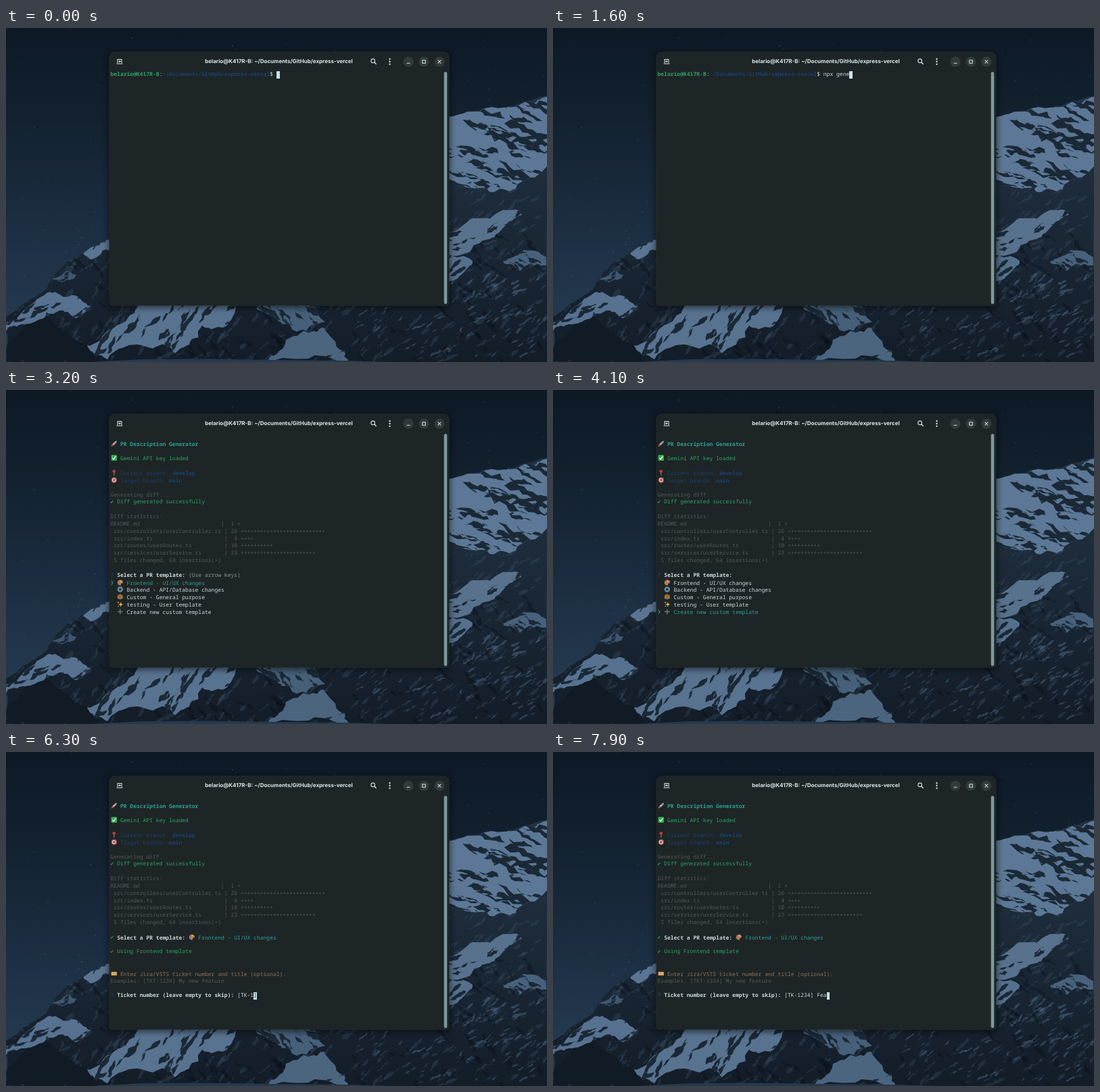
Recreate the animation shown at these times as an HTML page with a canvas. Size 800 by 495 pixels, loop 8 s.

```html
<!DOCTYPE html>
<html lang="en">
<head>
<meta charset="utf-8">
<title>Terminal</title>
<style>
html, body { margin: 0; width: 100%; height: 100%; overflow: hidden; background: #111d2a; }
#stage { position: relative; width: 800px; height: 495px; overflow: hidden; }
#wall, #chrome { position: absolute; left: 0; top: 0; }
#win {
  position: absolute; left: 153px; top: 36px; width: 502px; height: 375px;
  background: #1e2526; border-radius: 8px 8px 4px 4px;
  box-shadow: 0 0 0 .5px #2a3536, 0 2px 9px 2px rgba(0, 0, 0, .5);
}
#title {
  position: absolute; left: 253px; top: 43px; width: 301px; height: 13px;
  font: 700 8px/13px Inter, "Open Sans", sans-serif; text-align: center;
  color: #d9e8ea; white-space: pre; text-rendering: geometricPrecision;
}
#term {
  position: absolute; left: 154.5px; top: 64px; color: #c9dadd;
  font: 8.03px/10.83px "Noto Sans Mono", "DejaVu Sans Mono", monospace;
  white-space: pre; text-rendering: geometricPrecision; font-variant-ligatures: none;
}
.row { position: absolute; left: 0; height: 10.83px; }
.row svg { width: 2ch; height: 9px; vertical-align: -1.5px; }
.one, .cur { display: inline-block; width: 1ch; height: 10.83px; vertical-align: top; }
.one { font-family: "DejaVu Sans Mono", monospace; }
.cur { background: #c8e2e8; color: #1e2526; }
.b { font-weight: 700; }
.green { color: #2ba567; }
.cyan { color: #2ba39a; }
.blue { color: #1b4273; }
.gray { color: #515a5b; }
.hint { color: #8c999b; }
.tan { color: #8d7460; }
</style>
</head>
<body>
<div id="stage">
  <canvas id="wall" width="800" height="495"></canvas>
  <div id="win"></div>
  <svg id="chrome" width="800" height="495" fill="none" stroke="#d3e3e6" stroke-width="1.1">
    <path d="M165 52v-5.5h6v5.5M163.5 53h9M168 47.7v3.6M166.2 49.5h3.6"/>
    <circle cx="542.6" cy="48.7" r="2.8"/><path d="M544.7 50.8l2.9 2.9" stroke-width="1.4"/>
    <g fill="#d3e3e6" stroke="none">
      <circle cx="567.5" cy="46" r="1.2"/><circle cx="567.5" cy="49.8" r="1.2"/><circle cx="567.5" cy="53.6" r="1.2"/>
    </g>
    <g fill="#323b3c" stroke="none">
      <circle cx="595" cy="50" r="7.6"/><circle cx="618" cy="50" r="7.6"/><circle cx="641" cy="50" r="7.6"/>
    </g>
    <path d="M592.6 52.3h4.8M615.8 47.8h4.4v4.4h-4.4zM638.7 47.7l4.6 4.6M643.3 47.7l-4.6 4.6"/>
    <rect x="647.7" y="65" width="4.6" height="344" rx="2.3" fill="#7d999b" stroke="none"/>
  </svg>
  <div id="title"></div>
  <div id="term"></div>
</div>

<svg width="0" height="0" style="position:absolute">
  <symbol id="rocket" viewBox="0 0 10 10">
    <path d="M1 6l3-2 2 2-2 3z" fill="#c4423d"/><path d="M3 6q2-5 6.5-5.5Q9 5 4 7z" fill="#b9c8cf"/>
    <circle cx="6.5" cy="3.4" r="1.1" fill="#3b6f96"/><path d="M.5 9.5l1-2.5 1.6 1.5z" fill="#e3a13b"/>
  </symbol>
  <symbol id="ok" viewBox="0 0 10 10">
    <rect x=".3" y=".3" width="9.4" height="9.4" rx="1.5" fill="#35ad52"/>
    <path d="M2.2 5.2l2 2.2 3.7-5" fill="none" stroke="#e6f5ea" stroke-width="1.4"/>
  </symbol>
  <symbol id="pin" viewBox="0 0 10 10">
    <path d="M5 4v5.8" stroke="#8d9ca3"/><circle cx="5" cy="2.9" r="2.6" fill="#bd3c38"/>
  </symbol>
  <symbol id="goal" viewBox="0 0 10 10">
    <circle cx="5" cy="5" r="4.7" fill="#b64740"/><circle cx="5" cy="5" r="3.3" fill="#cdd3d3"/>
    <circle cx="5" cy="5" r="2" fill="#b64740"/><path d="M5 5l4-4" stroke="#4f7891"/>
  </symbol>
  <symbol id="palette" viewBox="0 0 10 10">
    <path d="M5 .6C10 .6 11 6 7.5 6 5.5 6 7.5 9.4 5 9.4-1 9.4-1 .6 5 .6z" fill="#bd8256"/>
    <circle cx="3" cy="3.4" r="1.1" fill="#cf4a45"/><circle cx="6" cy="2.6" r="1.1" fill="#e0bd4b"/>
    <circle cx="2.8" cy="6.4" r="1.1" fill="#4b88b8"/>
  </symbol>
  <symbol id="gear" viewBox="0 0 10 10">
    <circle cx="5" cy="5" r="4" fill="none" stroke="#7ba5b7" stroke-width="1.5" stroke-dasharray="1.7 .8"/>
    <circle cx="5" cy="5" r="2.7" fill="none" stroke="#7ba5b7" stroke-width="1.3"/>
  </symbol>
  <symbol id="box" viewBox="0 0 10 10">
    <path d="M.6 2.8L5 .6l4.4 2.2v4.6L5 9.5.6 7.4z" fill="#ab7646"/>
    <path d="M.6 2.8L5 5l4.4-2.2M5 5v4.5" fill="none" stroke="#705034" stroke-width=".9"/>
  </symbol>
  <symbol id="spark" viewBox="0 0 10 10" fill="#e6b74c">
    <path d="M6 1l1 3.2L10 5.3 7 6.4 6 9.8 5 6.4 2 5.3l3-1.1z"/>
    <path d="M2 .3l.5 1.5L4 2.3l-1.5.5L2 4.3l-.5-1.5L0 2.3l1.5-.5zM2 6.8l.4 1.1 1.1.4-1.1.4L2 9.8l-.4-1.1-1.1-.4 1.1-.4z"/>
  </symbol>
  <symbol id="plus" viewBox="0 0 10 10">
    <path d="M5 .8v8.4M.8 5h8.4" stroke="#68777a" stroke-width="1.7"/>
  </symbol>
  <symbol id="ticket" viewBox="0 0 10 10">
    <rect x=".2" y="2" width="9.6" height="6" rx=".8" fill="#cf9a4c"/>
    <rect x="2.3" y="3.4" width="5.4" height="3.2" fill="#ead6a3"/><path d="M3 5h4" stroke="#a5533c"/>
  </symbol>
</svg>

<script>
const LOOP = 8000, ROW = 10.83;
const USER = "belario@K417R-B", DIR = "~/Documents/GitHub/express-vercel";
const COMMAND = "npx generate-pr";
const term = document.getElementById("term");
document.getElementById("title").textContent = `${USER}: ${DIR}`;

// Wallpaper
function random(seed) {
  return () => {
    seed = (seed + 0x6d2b79f5) | 0;
    let t = Math.imul(seed ^ (seed >>> 15), 1 | seed);
    t = (t + Math.imul(t ^ (t >>> 7), 61 | t)) ^ t;
    return ((t ^ (t >>> 14)) >>> 0) / 4294967296;
  };
}

function paintWall() {
  const c = document.getElementById("wall").getContext("2d");
  const rnd = random(41);
  const between = (a, b) => a + (b - a) * rnd();

  function rough(points, depth = 3, amount = .2) {
    if (!depth) return points;
    const out = [];
    points.forEach(([x, y], i) => {
      const [u, v] = points[(i + 1) % points.length];
      const d = Math.min(Math.hypot(u - x, v - y), 40) * amount;
      out.push([x, y], [(x + u) / 2 + between(-d, d), (y + v) / 2 + between(-d, d)]);
    });
    return rough(out, depth - 1, amount);
  }
  function trace(points) {
    const path = new Path2D();
    points.forEach(p => path.lineTo(...p));
    path.closePath();
    return path;
  }
  function streaks([x0, y0, x1, y1], count, angle, length, width, color) {
    c.fillStyle = color;
    for (let i = 0; i < count; i++) {
      c.save();
      c.translate(between(x0, x1), between(y0, y1));
      c.rotate(angle + between(-.3, .3));
      const l = length * between(.4, 1), w = width * between(.3, 1);
      c.fill(trace(rough([[-l, 0], [0, -w], [l, 0], [0, w]], 2, .22)));
      c.restore();
    }
  }
  function snow(points, color, count, angle, length, width) {
    const path = trace(rough(points));
    const xs = points.map(p => p[0]), ys = points.map(p => p[1]);
    const area = [Math.min(...xs), Math.min(...ys), Math.max(...xs), Math.max(...ys)];
    c.save();
    c.clip(path);
    c.fillStyle = color;
    c.fillRect(0, 0, 800, 495);
    streaks(area, count, angle, length, width, "#1b2937");
    streaks(area, count, angle, length / 2, width / 2, color);
    c.restore();
  }

  const sky = c.createLinearGradient(0, 0, 0, 440);
  [[0, "#0d1925"], [.3, "#13212f"], [.65, "#1b2d41"], [1, "#253a50"]]
    .forEach(stop => sky.addColorStop(...stop));
  c.fillStyle = sky;
  c.fillRect(0, 0, 800, 495);
  for (let i = 0; i < 190; i++) {
    c.fillStyle = `rgba(135,165,190,${between(.08, .45)})`;
    const s = between(.6, 1.5);
    c.fillRect(between(0, 800), between(0, 380), s, s);
  }

  const rock = c.createLinearGradient(0, 120, 0, 495);
  rock.addColorStop(0, "#223243");
  rock.addColorStop(1, "#131d28");
  const range = trace(rough([
    [0, 428], [22, 412], [60, 387], [69, 367], [90, 347], [118, 331], [153, 309],
    [300, 250], [500, 250], [640, 132], [700, 122], [740, 118], [766, 109], [800, 100],
    [800, 495], [0, 495]
  ], 3, .08));
  c.save();
  c.clip(range);
  c.fillStyle = rock;
  c.fillRect(0, 0, 800, 495);
  streaks([0, 310, 400, 495], 170, -.8, 18, 3, "rgba(55,76,98,.38)");
  streaks([400, 230, 800, 495], 230, -.65, 17, 3, "rgba(55,76,98,.38)");
  streaks([0, 310, 800, 495], 150, .8, 18, 4, "rgba(9,16,24,.42)");

  snow([[640, 132], [700, 124], [765, 111], [800, 102], [800, 205], [770, 224], [745, 242], [700, 237], [640, 229]],
    "#5c7896", 38, .28, 38, 6);
  snow([[640, 312], [700, 282], [757, 270], [763, 277], [722, 310], [690, 325], [640, 338]],
    "#58728e", 13, -.5, 24, 4);
  snow([[640, 337], [690, 345], [679, 360], [640, 374]], "#55708d", 5, -.4, 20, 3);
  snow([[735, 346], [766, 329], [800, 340], [800, 352], [760, 360]], "#48617c", 10, .5, 18, 4);
  snow([[114, 335], [153, 311], [165, 330], [127, 343]], "#5a7592", 5, -.5, 14, 3);
  snow([[68, 371], [90, 359], [105, 366], [80, 376]], "#3f5771", 6, -.5, 12, 3);
  snow([[0, 435], [30, 414], [65, 391], [100, 396], [125, 412], [104, 430], [60, 421], [20, 440], [0, 449]],
    "#577290", 17, -.45, 20, 4);
  snow([[118, 470], [165, 440], [200, 405], [345, 405], [330, 436], [290, 441], [250, 482], [200, 470], [150, 491]],
    "#587390", 36, -.9, 24, 5);
  snow([[365, 405], [440, 405], [472, 436], [430, 450], [400, 431]], "#466079", 16, .65, 22, 5);
  streaks([520, 415, 800, 485], 55, -.6, 10, 1.6, "rgba(80,107,136,.45)");
  streaks([657, 370, 800, 430], 30, -.6, 13, 2, "rgba(80,107,136,.5)");
  snow([[378, 495], [410, 474], [440, 449], [470, 444], [501, 477], [506, 495]], "#4b657f", 2, -.5, 12, 2);

  c.fillStyle = "#111b26";
  c.fill(trace(rough([[0, 470], [30, 441], [60, 427], [95, 455], [120, 470], [138, 495], [0, 495]], 3, .1)));
  c.restore();
}

// Terminal
const span = (cls, text) => `<span class="${cls}">${text}</span>`;
const icon = id => `<svg><use href="#${id}"/></svg>`;
const tick = span("one green", "✔");
const ask = span("b blue", "?");
const cursor = (char = " ") => span("cur", char);

const header = {
  1: `${icon("rocket")} ${span("b cyan", "PR Description Generator")}`,
  3: `${icon("ok")} ${span("green", "Gemini API key loaded")}`,
  5: `${icon("pin")} ${span("blue", `Current branch: ${span("b", "develop")}`)}`,
  6: `${icon("goal")} ${span("blue", `Target branch: ${span("b", "main")}`)}`
};

const stat = (file, n, width = 34) =>
  span("gray", `${file.padEnd(width)} | ${String(n).padStart(2)} ${"+".repeat(n)}`);
const diff = {
  8: span("gray", "Generating diff..."),
  9: `${tick} ${span("green", "Diff generated successfully")}`,
  11: span("gray", "Diff statistics:"),
  12: stat("README.md", 1, 33),
  13: stat(" src/controllers/userController.ts", 26),
  14: stat(" src/index.ts", 4),
  15: stat(" src/routes/userRoutes.ts", 10),
  16: stat(" src/services/userService.ts", 23),
  17: span("gray", " 5 files changed, 64 insertions(+)")
};

const options = [
  ["palette", "Frontend - UI/UX changes"],
  ["gear", "Backend - API/Database changes"],
  ["box", "Custom - General purpose"],
  ["spark", "testing - User template"],
  ["plus", "Create new custom template"]
];
const question = span("b", "Select a PR template:");

// Each entry: start time, value
const picks = [[0, 0], [3400, 1], [3600, 2], [3800, 3], [4000, 4], [4300, 0]];
const keys = [
  [4500, "|"], [4900, "[|"], [5200, "[]|"], [5400, "[|]"], [5600, "[T|]"], [5800, "[TK|]"],
  [6000, "[TK-|]"], [6200, "[TK-1|]"], [6500, "[TK-12|]"], [6700, "[TK-123|]"],
  [6900, "[TK-1234|]"], [7100, "[TK-1234]|"], [7300, "[TK-1234] |"], [7500, "[TK-1234] F|"],
  [7700, "[TK-1234] Fe|"], [7900, "[TK-1234] Fea|"]
];
const at = (steps, t) => steps.filter(s => s[0] <= t).pop()[1];

function shell(t) {
  const count = t <= 1600 ? Math.floor(t / 200) : 8 + (t - 1600) / 100;
  const prompt = `${span("b green", USER)}:${span("b blue", DIR)}$ ${COMMAND.slice(0, count)}`;
  return t < 2500 ? { 0: prompt + cursor() } : { 0: prompt, 1: cursor() };
}

function menu(t) {
  const picked = at(picks, t);
  const rows = { 19: `${ask} ${question}${t < 3400 ? span("hint", " (Use arrow keys)") : ""}` };
  options.forEach(([id, label], i) => {
    const on = i === picked;
    rows[20 + i] = `${on ? span("one cyan", "❯") : " "} ${icon(id)} ${on ? span("cyan", label) : label}`;
  });
  return rows;
}

function ticket(t) {
  const [before, after] = at(keys, t).split("|");
  return {
    19: `${tick} ${question} ${icon("palette")} ${span("cyan", options[0][1])}`,
    21: `${tick} ${span("green", "Using Frontend template")}`,
    24: `${icon("ticket")} ${span("tan", "Enter Jira/VSTS ticket number and title (optional):")}`,
    25: span("gray", "Examples: [TKT-1234] My new feature"),
    27: `${ask} ${span("b", "Ticket number (leave empty to skip):")} ${before}${cursor(after || " ")}`
  };
}

function screen(t) {
  if (t < 2700) return shell(t);
  if (t < 2800) return header;
  return { ...header, ...diff, ...(t < 4500 ? menu(t) : ticket(t)) };
}

let shown = -1;
function draw() {
  const t = Math.floor(performance.now() % LOOP / 100) * 100;
  if (t !== shown) {
    shown = t;
    term.innerHTML = Object.entries(screen(t))
      .map(([row, html]) => `<div class="row" style="top:${row * ROW}px">${html}</div>`).join("");
  }
  requestAnimationFrame(draw);
}

paintWall();
draw();
</script>
</body>
</html>
```
